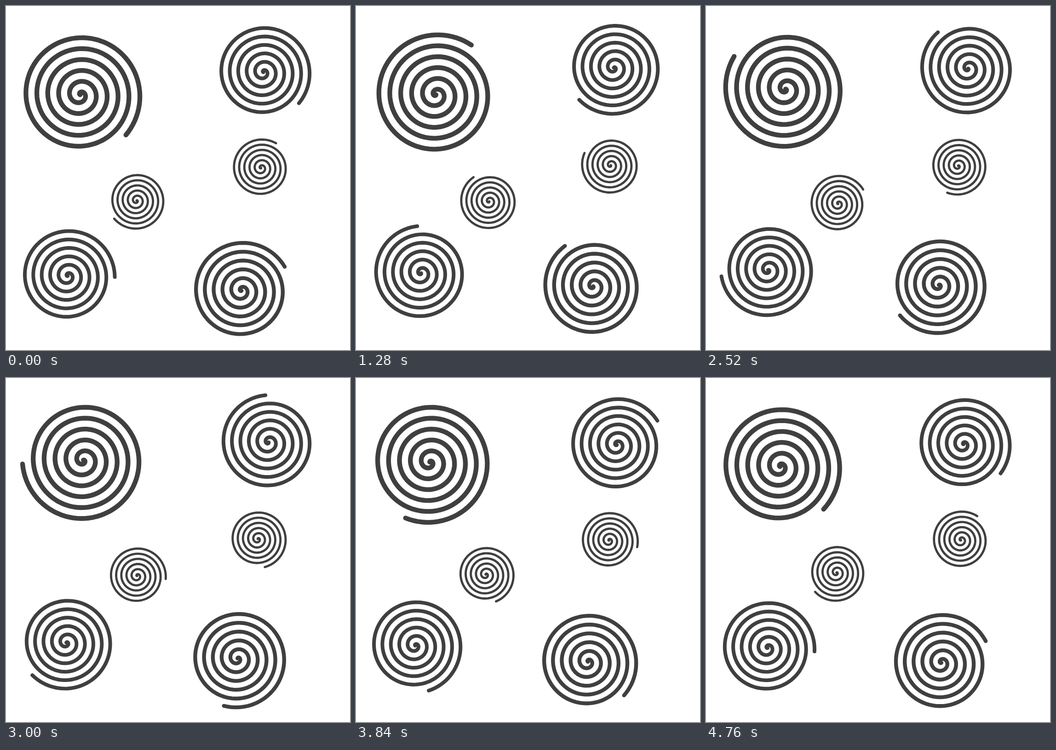
These frames come from a looping animation (748 by 748 pixels, 4800 ms). An HTML page with a canvas:

```html
<!DOCTYPE html>
<html>
<head>
<meta charset="utf-8">
<title>Turning spirals</title>
<style>
  html, body { margin: 0; width: 100%; height: 100%; overflow: hidden; background: #fff; }
  canvas { display: block; width: 748px; height: 748px; }
</style>
</head>
<body>
<canvas id="stage" width="748" height="748"></canvas>
<script>
const ctx = document.getElementById('stage').getContext('2d');
const LOOP = 4800, STEP = 40;
const TURNS = 5.58;
const TAU = Math.PI * 2;
const rad = deg => deg * Math.PI / 180;

// x, y: pivot; pitch: gap between windings; tip: start angle of the outer end; dir: 1 is clockwise
const spirals = [
  { x: 167.7, y: 187.2, pitch: 23.75, tip: 41.4, dir: -1 },
  { x: 564.5, y: 139.5, pitch: 18.4, tip: 41.1, dir: 1 },
  { x: 551.6, y: 349.7, pitch: 11.25, tip: -59, dir: -1 },
  { x: 286, y: 426.5, pitch: 11.2, tip: 141, dir: 1 },
  { x: 135.1, y: 580.6, pitch: 18.35, tip: 1.2, dir: -1 },
  { x: 509.7, y: 612.6, pitch: 19.2, tip: -29, dir: -1 }
];

// Archimedean spiral with its outer end on the positive x axis
function spiralPath() {
  const path = new Path2D();
  const perTurn = 90, count = Math.round(TURNS * perTurn);
  path.moveTo(0, 0);
  for (let i = 1; i <= count; i++) {
    const turn = TURNS * i / count;
    const angle = (turn - TURNS) * TAU;
    path.lineTo(turn * Math.cos(angle), turn * Math.sin(angle));
  }
  return path;
}

const path = spiralPath();
// The spiral turns about the middle of its outline, a little off its pole
const pole = { x: 0.361 * Math.cos(rad(97)), y: 0.361 * Math.sin(rad(97)) };

function draw(time) {
  const turned = Math.floor(time % LOOP / STEP) * STEP / LOOP * TAU;
  ctx.fillStyle = '#fff';
  ctx.fillRect(0, 0, 748, 748);
  ctx.strokeStyle = '#3f3f40';
  ctx.lineWidth = 0.435;
  ctx.lineCap = ctx.lineJoin = 'round';
  for (const s of spirals) {
    ctx.save();
    ctx.translate(s.x, s.y);
    ctx.rotate(rad(s.tip) + s.dir * turned);
    ctx.scale(s.pitch, s.pitch);
    ctx.translate(pole.x, pole.y);
    ctx.stroke(path);
    ctx.restore();
  }
}

const start = performance.now();
function tick() {
  draw(performance.now() - start);
  requestAnimationFrame(tick);
}
tick();
</script>
</body>
</html>
```
